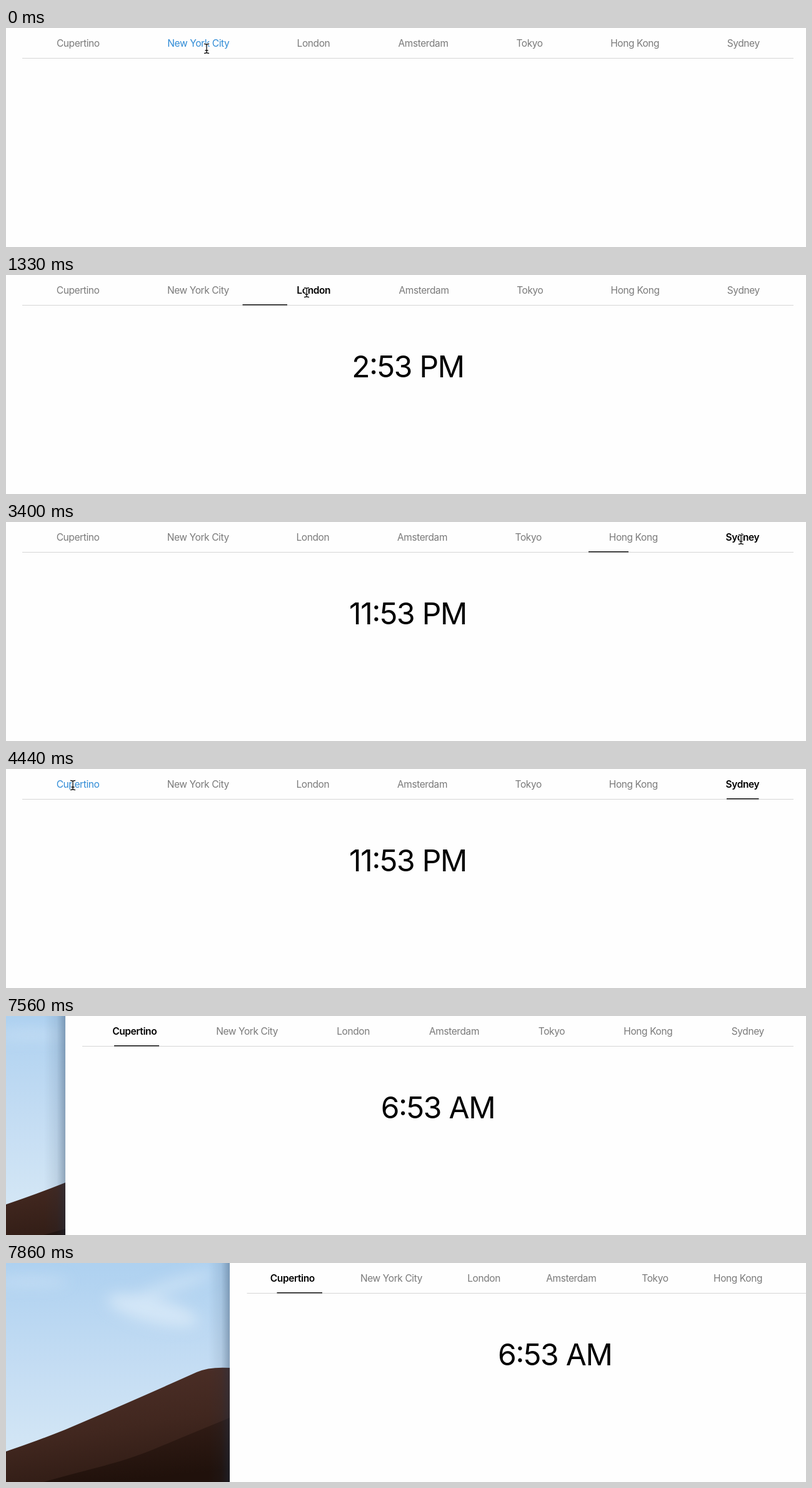
An HTML page for the animation above (8000 ms loop, 1280 px wide and 351 px high).

```html
<!DOCTYPE html>
<html lang="en">
<head>
<meta charset="utf-8">
<title>World clock tabs</title>
<style>
  html, body { margin: 0; width: 100%; height: 100%; overflow: hidden; background: #fefefe; }
  svg { display: block; width: 100%; height: 100%; }
  text { font-family: Inter, Roboto, sans-serif; text-anchor: middle; white-space: pre; }
  .tab { font-size: 15.5px; letter-spacing: -0.4px; fill: #7a7a7a; }
  .tab.hover { fill: #2f8bd6; }
  .tab.active { fill: #000; font-weight: 600; }
  #time { font-size: 48px; letter-spacing: -1.3px; fill: #000; font-feature-settings: "calt" 0; }
</style>
</head>
<body>
<svg viewBox="0 0 1280 351">
  <defs>
    <linearGradient id="sky" x2="0" y2="1">
      <stop offset="0" stop-color="#aed1f0"/>
      <stop offset=".45" stop-color="#c3dcf3"/>
      <stop offset=".85" stop-color="#d3e6f5"/>
    </linearGradient>
    <linearGradient id="sand" x2=".35" y2="1">
      <stop offset="0" stop-color="#50312a"/>
      <stop offset=".6" stop-color="#41271f"/>
      <stop offset="1" stop-color="#301c15"/>
    </linearGradient>
    <linearGradient id="shade" x2=".3" y2="1">
      <stop offset="0" stop-color="#3c231c"/>
      <stop offset="1" stop-color="#20110b"/>
    </linearGradient>
    <linearGradient id="shadow">
      <stop offset="0" stop-color="#1c3450" stop-opacity="0"/>
      <stop offset=".6" stop-color="#1c3450" stop-opacity=".1"/>
      <stop offset="1" stop-color="#1c3450" stop-opacity=".36"/>
    </linearGradient>
    <filter id="soft" x="-50%" y="-100%" width="200%" height="300%"><feGaussianBlur stdDeviation="11"/></filter>
  </defs>

  <g id="desktop">
    <rect width="420" height="351" fill="url(#sky)"/>
    <g fill="#dcebf8" filter="url(#soft)">
      <ellipse cx="40" cy="30" rx="60" ry="6" opacity=".6"/>
      <ellipse cx="235" cy="76" rx="75" ry="20" transform="rotate(14 235 76)" opacity=".75"/>
      <ellipse cx="270" cy="35" rx="65" ry="9" transform="rotate(-18 270 35)" opacity=".6"/>
    </g>
    <path fill="url(#sand)" d="M0 302 Q50 285 95 267 Q205 220 305 175 Q325 166 358 168 L420 176 V351 H0Z"/>
    <path fill="url(#shade)" d="M60 351 C140 328 180 322 240 297 Q290 276 358 248 L420 225 V351Z"/>
  </g>

  <rect id="shadow-edge" y="0" width="34" height="351" fill="url(#shadow)"/>
  <rect id="window" y="-2" height="355" fill="#fefefe"/>
  <rect id="rule" y="48" height="1" fill="#d6d6d6"/>
  <rect id="underline" y="47" height="1.5" fill="#111"/>
  <g id="tabs"></g>
  <text id="time" y="164"><tspan id="hour"></tspan><tspan dy="-5">:</tspan><tspan id="rest" dy="5"></tspan></text>

  <g id="beam" fill="none" stroke-linecap="round">
    <path id="beam-shape" stroke="#fff" stroke-width="3"
      d="M-3.5 -7.5 Q-.5 -7.5 0 -6 Q.5 -7.5 3.5 -7.5 M0 -6 V6 M-3.5 7.5 Q-.5 7.5 0 6 Q.5 7.5 3.5 7.5 M-2 3 H2"/>
    <use href="#beam-shape"/>
    <path stroke="#111" stroke-width="1.3"
      d="M-3.5 -7.5 Q-.5 -7.5 0 -6 Q.5 -7.5 3.5 -7.5 M0 -6 V6 M-3.5 7.5 Q-.5 7.5 0 6 Q.5 7.5 3.5 7.5 M-2 3 H2"/>
  </g>
  <path id="arrow" fill="#000" stroke="#fff" d="M0 0 V15 L3.5 11.8 L6 17.3 L8.5 16.2 L6.2 10.8 H11Z"/>
</svg>

<script>
const LOOP = 8000;
const $ = id => document.getElementById(id);

// label, regular width, selected width, time shown
const cities = [
  ["Cupertino", 70, 73, "6:53 AM"],
  ["New York City", 98, 102, "9:53 AM"],
  ["London", 53, 55, "2:53 PM"],
  ["Amsterdam", 81, 85, "9:53 AM"],
  ["Tokyo", 42, 44, ""],
  ["Hong Kong", 78, 81, ""],
  ["Sydney", 52, 55, "11:53 PM"]
].map(([name, regular, bold, time]) => ({ name, regular, bold, time }));

const start = { at: 0, active: -1, cursor: [321, 33], bar: [0, 0], left: -1, rule: [26, 1260] };

// each step changes only the listed parts of the one before
const steps = [
  start,
  { at: 150, active: 1, bar: [161, 57] },
  { at: 300, bar: [258, 98] },
  { at: 440, cursor: [325, 33] },
  { at: 590, cursor: [345, 34] },
  { at: 730, cursor: [395, 36] },
  { at: 880, cursor: [450, 31] },
  { at: 1030, cursor: [481, 28] },
  { at: 1330, active: 2, bar: [378.5, 71.5] },
  { at: 1480, bar: [465, 53] },
  { at: 1630, cursor: [490, 29] },
  { at: 1770, cursor: [560, 34] },
  { at: 1920, cursor: [630, 33] },
  { at: 2060, cursor: [631, 33] },
  { at: 2210, active: 3, bar: [559, 69] },
  { at: 2350, bar: [626.5, 81] },
  { at: 2500, cursor: [690, 52] },
  { at: 2650, cursor: [800, 66] },
  { at: 2800, cursor: [960, 62] },
  { at: 2950, cursor: [1110, 42] },
  { at: 3100, cursor: [1176, 28] },
  { at: 3400, active: 6, bar: [932, 64] },
  { at: 3550, bar: [1153, 51.5] },
  { at: 3700, cursor: [1165, 31] },
  { at: 3840, cursor: [1040, 58] },
  { at: 3990, cursor: [780, 72] },
  { at: 4140, cursor: [440, 60] },
  { at: 4290, cursor: [190, 38] },
  { at: 4440, cursor: [107, 26] },
  { at: 4730, active: 0, bar: [530, 62] },
  { at: 4880, bar: [95, 69] },
  { at: 5020, bar: [78.5, 69.5] },
  { at: 5320, cursor: [85, 75] },
  { at: 5470, cursor: [45, 150] },
  { at: 5610, cursor: [8, 216] },
  { at: 5760, cursor: null },
  { at: 7560, left: 95, rule: [122, 1260], bar: [173, 72] },
  { at: 7710, left: 228, rule: [255, 1260], bar: [304, 72] },
  { at: 7860, left: 358, rule: [385.5, 1371], bar: [433.5, 72.5] }
];
let last = {};
const states = steps.map(step => last = { ...last, ...step });

function set(el, attrs) {
  for (const key in attrs) el.setAttribute(key, attrs[key]);
}

for (const city of cities) {
  city.el = document.createElementNS("http://www.w3.org/2000/svg", "text");
  city.el.textContent = city.name;
  $("tabs").append(city.el);
}

function placeCursor(el, cursor, visible) {
  el.style.display = visible ? "" : "none";
  if (visible) set(el, { transform: `translate(${cursor})` });
}

function draw({ active, cursor, bar, left, rule }) {
  const [from, to] = rule;
  const widths = cities.map((city, i) => i === active ? city.bold : city.regular);
  const gap = (to - from - widths.reduce((a, b) => a + b)) / cities.length;
  let x = from + gap / 2;
  let overTab = false;

  cities.forEach((city, i) => {
    const w = widths[i];
    const hover = cursor && cursor[1] < 40 && cursor[0] > x - 1 && cursor[0] < x + w + 1;
    overTab ||= hover;
    const state = i === active ? " active" : hover ? " hover" : "";
    set(city.el, { x: x + w / 2, y: 30, class: "tab" + state });
    x += w + gap;
  });

  const [hour, rest] = active < 0 ? ["", ""] : cities[active].time.split(":");
  $("time").style.display = active < 0 ? "none" : "";
  $("hour").textContent = hour;
  $("rest").textContent = rest;
  set($("time"), { x: (from + to) / 2 });

  set($("rule"), { x: from, width: to - from });
  set($("underline"), { x: bar[0], width: bar[1] });
  set($("window"), { x: left, width: 1300 });
  set($("shadow-edge"), { x: left - 34 });
  $("desktop").style.display = left > 0 ? "" : "none";
  placeCursor($("beam"), cursor, cursor && overTab);
  placeCursor($("arrow"), cursor, cursor && !overTab);
}

let shown;
function tick() {
  const t = performance.now() % LOOP;
  const state = states.findLast(s => s.at <= t);
  if (state !== shown) draw(shown = state);
  requestAnimationFrame(tick);
}
tick();
</script>
</body>
</html>
```
